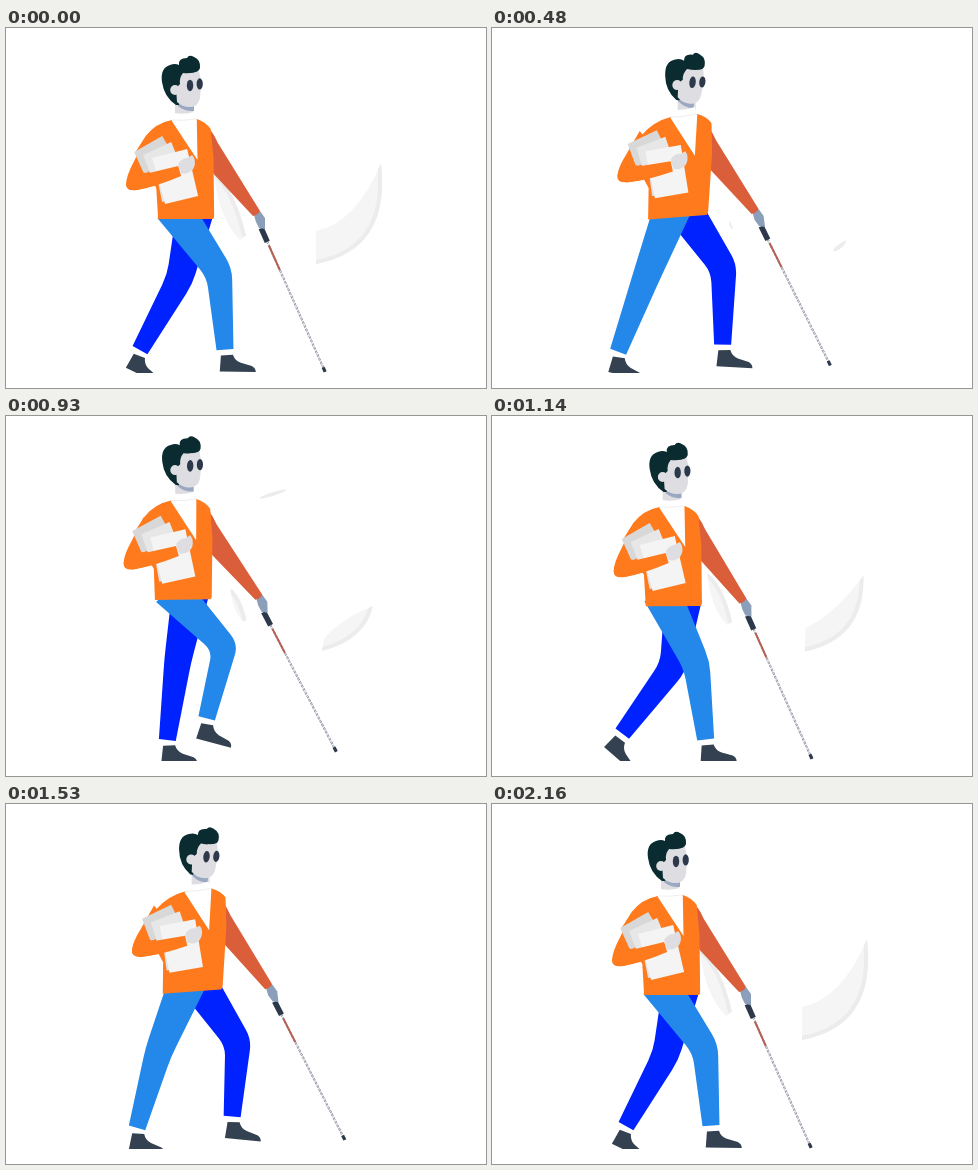
Animation of 480 by 360 pixels, one loop 2.19 s. Source, as an HTML page with a canvas:

```html
<!DOCTYPE html>
<html lang="en">
<head>
<meta charset="utf-8">
<title>Walking with a cane</title>
<style>
html, body { margin: 0; width: 100%; height: 100%; overflow: hidden; background: #fff; }
canvas { display: block; width: 480px; height: 360px; }
</style>
</head>
<body>
<canvas id="stage" width="480" height="360"></canvas>
<script>
const ctx = document.getElementById('stage').getContext('2d');
const LOOP = 2190, STEP = 30, CYCLE = 1080, GROUND = 345, DEG = Math.PI / 180;
const ORANGE = '#ff7a1c', SKIN = '#dedde1', SHOE = '#344151', DARK = '#2d394b', HAIR = '#0a2b30';

const mix = (a, b, k) => a + (b - a) * k;
const between = (a, b, k) => [mix(a[0], b[0], k), mix(a[1], b[1], k)];

// Rhythm of the walk: one swing per stride, one bob per step.
const angle = t => 2 * Math.PI * t / CYCLE;
const swing = (t, peak) => Math.cos(angle(t - peak));
const lean = (t, peak = 540) => (1 + swing(t, peak)) / 2;
const pulse = (t, peak, power) => lean(t, peak) ** power;
const rise = t => 5.7 * Math.cos(2 * angle(t - 10)) - 5.7;

const head = t => [8 + 8.7 * swing(t, 470), rise(t) - .8 * lean(t)];
const neck = t => [6.3 + 7.5 * swing(t, 450), rise(t) - 2.5 * lean(t)];
const hem = t => [1.3 + 5.2 * swing(t, 345), rise(t)];
const load = t => [1.8 + 4.8 * swing(t, 370), rise(t) - 2.5 * lean(t)];
const shoulder = t => [4.5 + 7 * swing(t, 430), .85 * rise(t) - lean(t)];
const cuff = t => [13 * lean(t), .55 * rise(t) - lean(t)];
const grip = t => [256 + 14.5 * lean(t), 202 + cuff(t)[1]];
const tip = t => [319 + 19 * lean(t, 570) - .9 * rise(t), 344 + rise(t) - 5 * lean(t)];

function fill(path, color) {
  ctx.fillStyle = color;
  ctx.fill(typeof path === 'string' ? new Path2D(path) : path);
}

function oval(x, y, rx, ry, color, turn = 0) {
  ctx.beginPath();
  ctx.ellipse(x, y, rx, ry, turn, 0, 7);
  ctx.fillStyle = color;
  ctx.fill();
}

function line(a, b, width, color, dash = []) {
  ctx.beginPath();
  ctx.moveTo(...a);
  ctx.lineTo(...b);
  ctx.setLineDash(dash);
  ctx.lineWidth = width;
  ctx.strokeStyle = color;
  ctx.stroke();
  ctx.setLineDash([]);
}

function turned([x, y], turn, [px, py], draw) {
  ctx.save();
  ctx.translate(x + px, y + py);
  ctx.rotate(turn * DEG);
  ctx.translate(-px, -py);
  draw();
  ctx.restore();
}

// t is the time since this foot was planted in front.
function leg(hip, t, dx, thigh, color) {
  const a = angle(t);
  const ankle = [
    167 + dx + 50 * Math.cos(a) + 4 * Math.sin(a) + 2 * Math.cos(2 * a) - 5 * Math.sin(2 * a),
    324 - 34 * pulse(t, 815, 4)
  ];
  const kneeX = 186 + dx + 34 * swing(t, 970);
  const knee = [kneeX, hip[1] + Math.sqrt(thigh ** 2 - (kneeX - hip[0]) ** 2)];

  const normal = (p, q) => {
    const x = q[0] - p[0], y = q[1] - p[1], l = Math.hypot(x, y);
    return [-y / l, x / l];
  };
  const n1 = normal(hip, knee), n3 = normal(knee, ankle);
  const sum = [n1[0] + n3[0], n1[1] + n3[1]], l = Math.hypot(...sum);
  const n2 = [sum[0] / l, sum[1] / l];
  const top = between(hip, knee, -.2);
  const off = (q, n, w) => [q[0] + n[0] * w, q[1] + n[1] * w];
  const side = s => [off(top, n1, 19 * s), off(knee, n2, 13.5 * s), off(ankle, n3, 8.5 * s)];
  const [p, q, r] = side(1), [u, v, w] = side(-1);
  const path = new Path2D();
  path.moveTo(...p);
  path.lineTo(...between(p, q, .86));
  path.quadraticCurveTo(...q, ...between(q, r, .14));
  path.lineTo(...r);
  path.lineTo(...w);
  path.lineTo(...between(v, w, .14));
  path.quadraticCurveTo(...v, ...between(u, v, .86));
  path.lineTo(...u);
  fill(path, color);

  turned(ankle, 56 * pulse(t, 710, 3), [0, 0],
    () => fill('M-4 6L8 5Q10 11 16 13L27 16Q31 18 31 22L-5 22Z', SHOE));
}

function drawLegs(t) {
  const h = hem(t), y = 190 + h[1];
  ctx.save();
  ctx.beginPath();
  ctx.rect(0, y - 5, 480, GROUND - y + 5);
  ctx.clip();
  leg([189 + 1.5 * h[0], y], (t + CYCLE / 2) % CYCLE, 15 - 5 * Math.sin(angle(t)), 63, '#0022ff');
  leg([175 + .5 * h[0], y], t, 0, 67, '#2488ea');
  ctx.restore();
}

// Pale drifting shapes: tip, curve, tip, corner, curve.
const BIG = [[375, 135], [385, 222], [310, 236], [310, 203], [350, 195]];
const BIG_THIN = [[367, 190], [359, 224], [316, 235], [318, 223], [334, 203]];
const SIDE = [[208, 145], [229, 160], [240, 208], [234, 212], [212, 190]];

const grow = (t, peak) => t <= peak ? Math.max(0, 1 - (peak - t) / 300) : 0;
const fade = (t, peak, time) => t >= peak ? Math.max(0, 1 - (t - peak) / time) : 0;
const toward = (from, to, k) => from.map((p, i) => between(p, to[i], k));
const shrink = (shape, point, k) => shape.map(p => between(point, p, k));

function pale([a, c, b, corner, d]) {
  const rim = new Path2D(), path = new Path2D();
  rim.moveTo(...a);
  rim.quadraticCurveTo(...c, ...b);
  path.addPath(rim);
  path.lineTo(...corner);
  path.quadraticCurveTo(...d, ...a);
  ctx.save();
  fill(path, '#f5f5f5');
  ctx.clip(path);
  ctx.lineWidth = 8;
  ctx.strokeStyle = '#ececec';
  ctx.stroke(rim);
  ctx.restore();
}

function drawPale(t) {
  const end = 2 * CYCLE, s = Math.min(t, end);
  const k = Math.max(fade(s, 0, 550), grow(s, CYCLE), fade(s, CYCLE, 270), grow(s, end));
  if (k > 0) {
    pale(k > .5 ? toward(BIG_THIN, BIG, 2 * k - 1) : shrink(BIG_THIN, [350, 220], 2 * k));
    pale(shrink(SIDE, [241, 200], k));
  }
  const g = grow(s, CYCLE), size = 4 * g * (1 - g);
  oval(267, 78, 14 * size, 1.8 * size, '#ececec', -.3);
}

function drawCane(t) {
  const a = grip(t), b = tip(t), len = Math.hypot(b[0] - a[0], b[1] - a[1]);
  const at = d => between(a, b, d / len);
  line(at(12), b, 1.9, '#77778a', [3, 1]);
  line(at(12), b, .8, '#f4f2f5');
  line(at(17), at(44), 1.9, '#b8604f');
  line(at(len - 5), b, 3.2, DARK);
  line(at(-2), at(13), 5.5, DARK);
}

function drawArm(t) {
  const s = shoulder(t), c = cuff(t), g = grip(t);
  const up = (x, y) => [x + s[0], y + s[1]], low = (x, y) => [x + c[0], y + c[1]];
  const hand = new Path2D();
  hand.moveTo(...low(248, 187));
  hand.lineTo(...low(254, 183));
  hand.lineTo(...low(259, 190));
  hand.lineTo(g[0] + 3, g[1] - 1);
  hand.lineTo(g[0] - 3, g[1] - 2);
  hand.lineTo(...low(250, 194));
  fill(hand, '#8b9fba');

  const sleeve = new Path2D();
  sleeve.moveTo(...up(198, 96));
  sleeve.quadraticCurveTo(...up(206, 99), ...up(213, 115));
  sleeve.lineTo(...low(254, 183));
  sleeve.quadraticCurveTo(...low(252, 187), ...low(247, 188));
  sleeve.lineTo(...up(207, 144));
  sleeve.lineTo(...up(198, 134));
  fill(sleeve, '#da5e3a');
}

function drawHead(t) {
  turned(head(t), 0, [0, 0], () => fill('M169 66L187 72V90H169Z', SKIN));
  turned(head(t), 7 * lean(t), [189, 56], () => {
    fill('M172 75Q180 80 188 78V83Q179 84 172 78Z', '#9ba8c2');
    fill('M170 77Q158 69 156 54Q154 40 164 37Q169 35 173 37Q172 30 181 30Q183 26 188 29Q195 32 194 40Q192 46 184 45L178 60L173 77Z', HAIR);
    fill('M177 45Q186 46 193 43Q196 54 194 70Q192 79 184 79Q176 79 171 74L170 60L174 56Q173 50 177 45Z', SKIN);
    oval(169, 62, 4.8, 5, SKIN);
    oval(184, 57.5, 3.2, 5.8, DARK);
    oval(193.7, 56, 3.1, 5.6, DARK);
  });
}

function drawTorso(t) {
  const n = neck(t), h = hem(t), k = lean(t);
  const sx = 1 + .07 * k, tilt = -.085 * k;
  const kx = (h[0] - n[0]) / 100, sy = 1 + (h[1] - n[1]) / 100;
  ctx.save();
  // Pivot at the collar; stretch and tilt toward the hem.
  ctx.translate(181 + n[0], 91 + n[1]);
  ctx.transform(sx, tilt, kx, sy, 0, 0);
  ctx.translate(-181, -91);
  fill('M166 92Q150 95 140 108L130 124L151 160L153 191H207Q209 191 209 188L208 130L205 101Q200 94 191 91Z', ORANGE);
  fill('M168 85Q178 87 188 84L191 92L192 132L166 93Z', '#fff');
  ctx.lineWidth = .7;
  ctx.strokeStyle = '#e8e8ea';
  ctx.stroke(new Path2D('M166 92Q178 93 190 91'));
  ctx.restore();
}

function drawLoad() {
  fill('M140 110L129 133Q121 148 121 156Q121 163 132 162L152 157L168 140Z', ORANGE);
  fill('M129 124L157 108L170 130L139 146Z', '#d8d8d9');
  fill('M138 127L166 114L176 138L146 148Z', '#e7e7e8');
  fill('M150 140L176 130L186 168L157 174Z', '#e2e2e3');
  fill('M147 130L182 121L193 168L160 176Z', '#f4f4f4');
  fill('M125 144L144 145L173 138L176 148Q150 159 132 162Q121 164 121 156Z', ORANGE);
  fill('M173 136Q177 130 182 130L187 127L189 130Q191 136 188 141Q183 147 176 145Z', SKIN);
}

function draw(t) {
  const p = t % CYCLE;
  ctx.fillStyle = '#fff';
  ctx.fillRect(0, 0, 480, 360);
  ctx.save();
  ctx.beginPath();
  ctx.rect(0, 0, 480, GROUND);
  ctx.clip();
  drawPale(t);
  drawLegs(p);
  drawCane(p);
  drawArm(p);
  drawHead(p);
  drawTorso(p);
  turned(load(p), 4.5 * lean(p, 580), [181, 137], drawLoad);
  ctx.restore();
}

const start = performance.now();
function tick() {
  const t = (performance.now() - start) % LOOP;
  draw(Math.floor(t / STEP) * STEP);
  requestAnimationFrame(tick);
}
tick();
</script>
</body>
</html>
```
